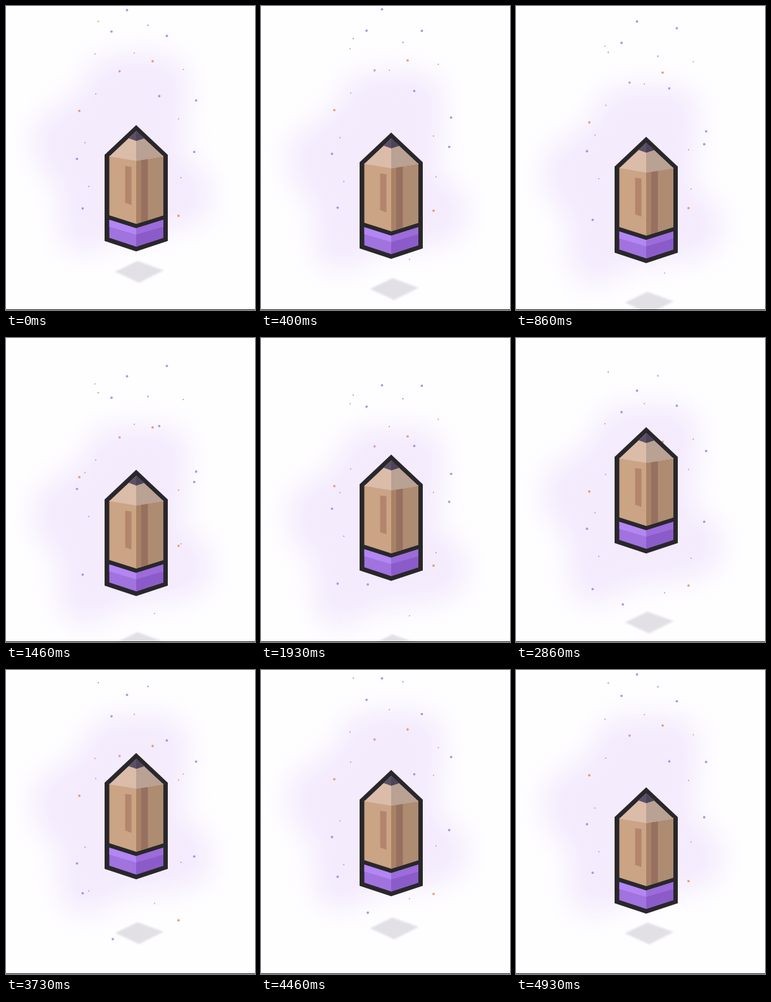
An HTML page that plays this animation: 394x480 px, repeating every 5000 ms.

```html
<!DOCTYPE html>
<html lang="en">
<head>
<meta charset="utf-8">
<title>Floating pencil</title>
<style>
html, body { margin: 0; width: 100%; height: 100%; overflow: hidden; background: #fefdff; }
svg { display: block; width: 394px; height: 480px; }
</style>
</head>
<body>
<svg viewBox="0 0 394 480">
  <defs>
    <filter id="glow" x="-40%" y="-40%" width="180%" height="180%" color-interpolation-filters="sRGB"><feGaussianBlur stdDeviation="18"/></filter>
    <filter id="soft" x="-20%" y="-20%" width="140%" height="140%" color-interpolation-filters="sRGB"><feGaussianBlur stdDeviation="1.5"/></filter>
  </defs>

  <g data-start="4665">
    <path filter="url(#glow)" fill="#f4ebfd" stroke="#f4ebfd" stroke-width="12" d="M140 95C180 78 250 74 274 95C294 130 270 190 275 235C294 258 326 270 318 312C306 354 240 348 200 354C160 362 140 394 103 378C78 350 98 310 83 282C58 252 38 230 55 188C78 158 122 160 140 95Z"/>
    <path filter="url(#soft)" fill="#e2e0e5" d="M208 402.500L249.500 417.500L210.500 437L172.500 419.500Z"/>
  </g>

  <g id="dotsC" data-start="4665" opacity=".88"></g>
  <g id="dotsA" data-start="5415" opacity=".88"></g>
  <g id="dotsB" data-start="6165" opacity=".88"></g>

  <!-- each part is a full silhouette with its shaded right half on top -->
  <g data-start="3905">
    <path fill="#29272b" d="M206 188L256 235V371L206 387.500L156 371V235Z"/>
    <!-- wood -->
    <path fill="#caa484" d="M163.500 236.500H249V330.500L206 344L163.500 330.500Z"/>
    <path fill="#a98266" d="M206 236.500H249V330.500L206 344Z"/>
    <path fill="#977060" d="M214 236.500H249V330.500L214 341.500Z"/>
    <path fill="#ae8c71" d="M224.500 236.500H249V330.500L224.500 338.200Z"/>
    <path fill="#b3856d" d="M188.500 252.500L198.500 254V314L188.500 310.500Z"/>
    <!-- tip -->
    <path fill="#dabca9" d="M206 197.500L249 237.500L206 244.500L163.500 237.500Z"/>
    <path fill="#b9a193" d="M206 197.500L249 237.500L206 244.500Z"/>
    <path fill="#5b5166" d="M206 197.500L219 208.700L206 213L194 208.700Z"/>
    <path fill="#4d4459" d="M206 197.500L219 208.700L206 213Z"/>
    <!-- base -->
    <path fill="#a173df" d="M163.500 337.500L206 351L249 337.500V366L206 380L163.500 366Z"/>
    <path fill="#8b5cc9" d="M206 351L249 337.500V366L206 380Z"/>
    <path fill="#b286f3" d="M163.500 337.500L206 351V361L163.500 348.500Z"/>
    <path fill="#9b6cda" d="M249 337.500L206 351V361L249 348.500Z"/>
  </g>

  <rect y="479" width="394" height="1" fill="#1c1b1e"/>
</svg>

<script>
const PERIOD = 5000, HALF = PERIOD / 2, TRAVEL = 78;
const COLORS = { v: '#9590dc', o: '#d99a62', p: '#d592b4' };

// Each dot: x, y, radius, colour key
const dots = {
  A: [[191.5, 6.5, 1.9, 'v'], [167, 40.3, 1.9, 'v'], [232, 87.2, 1.9, 'o'], [179.7, 103, 1.9, 'p'],
      [142, 138.7, 1, 'v'], [116, 165.7, 1.9, 'o'], [277, 271, 1, 'v'], [121.3, 319.7, 1.9, 'v']],
  B: [[254.5, 47.3, 1.9, 'v'], [140.8, 75.7, 1.1, 'p'], [280.5, 100.3, 1.1, 'o'], [242.5, 142.3, 1.9, 'v'],
      [125, 216, 1.1, 'o'], [112.3, 241.5, 1.9, 'v'], [297.8, 230.5, 1.9, 'v'], [131, 285, 1, 'v'],
      [273, 331.3, 1.9, 'o'], [169, 361, 1.9, 'v']],
  C: [[146, 24.3, 1.2, 'o'], [224.5, 30.3, 1.2, 'v'], [203, 74.3, 1.1, 'p'], [300.8, 149, 1.9, 'v'],
      [273, 178.2, 1.1, 'o'], [235, 373, 1.1, 'p']]
};
for (const key in dots) {
  document.getElementById('dots' + key).innerHTML = dots[key].map(([x, y, r, c]) =>
    `<circle cx="${x}" cy="${y}" r="${r}" fill="${COLORS[c]}"/>`).join('');
}

const curve = (u, a, b) => 3 * a * u * (1 - u) ** 2 + 3 * b * u * u * (1 - u) + u ** 3;

// cubic-bezier(.25, .1, .25, 1)
function ease(x) {
  let lo = 0, hi = 1;
  for (let i = 0; i < 24; i++) {
    const mid = (lo + hi) / 2;
    if (curve(mid, .25, .25) < x) lo = mid; else hi = mid;
  }
  return curve(lo, .1, 1);
}

// Down for half a period, then back up
function drift(t) {
  t = (t % PERIOD + PERIOD) % PERIOD;
  return TRAVEL * (t < HALF ? ease(t / HALF) : 1 - ease((t - HALF) / HALF));
}

const layers = [...document.querySelectorAll('[data-start]')].map(el => {
  const start = +el.dataset.start;
  return { el, start, rest: drift(-start) };
});

function draw(now) {
  for (const { el, start, rest } of layers) {
    el.setAttribute('transform', `translate(0 ${(drift(now - start) - rest).toFixed(2)})`);
  }
  requestAnimationFrame(draw);
}
draw(performance.now());
</script>
</body>
</html>
```
